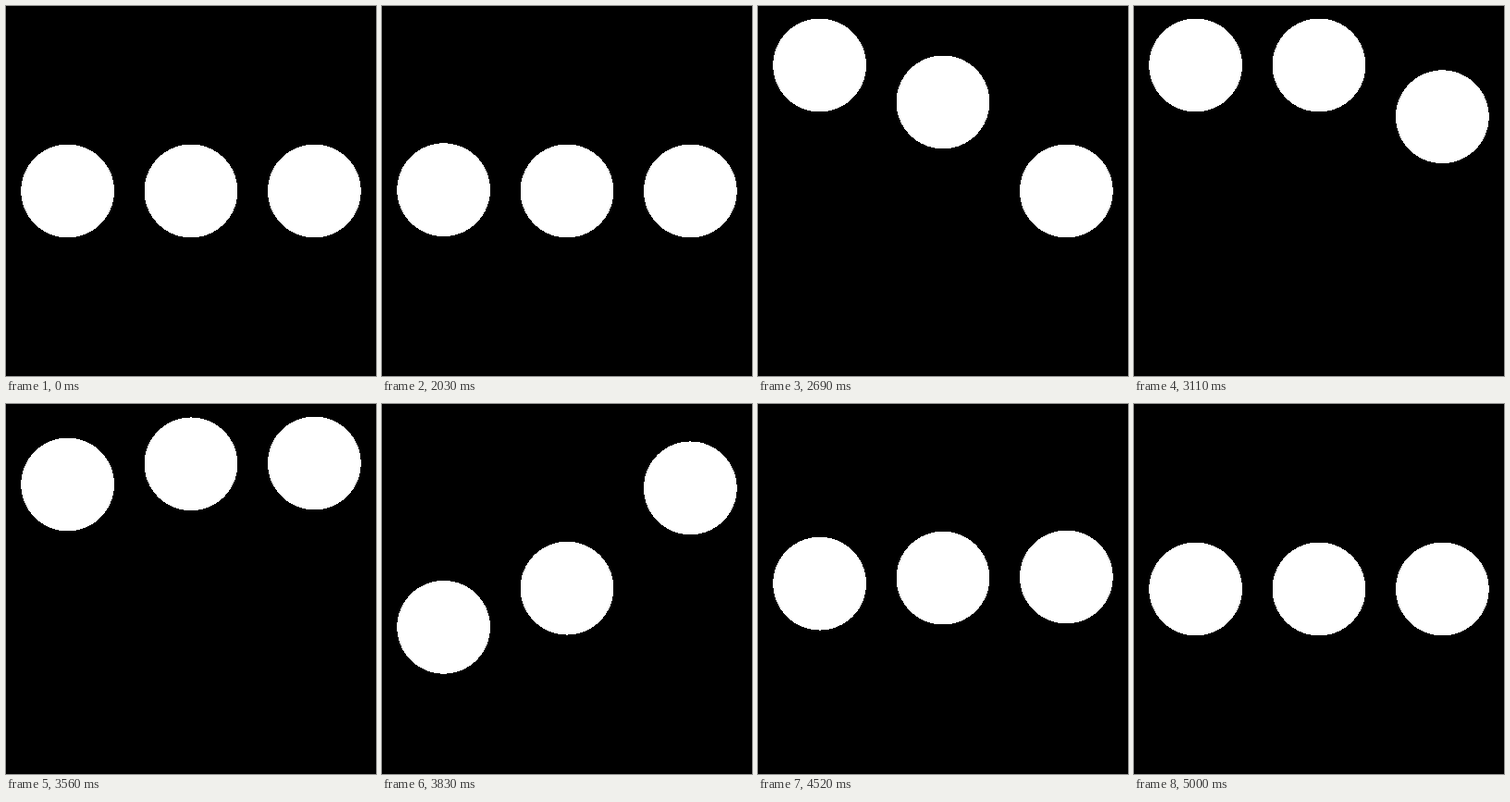
Write an HTML page that moves like this. It is 400 by 400 pixels and loops after 5.03 s.

```html
<!DOCTYPE html>
<html lang="en">
<head>
<meta charset="utf-8">
<title>Three dots</title>
<style>
  html, body { margin: 0; width: 100%; height: 100%; overflow: hidden; background: #000; }
  svg { display: block; width: 100vw; height: 100vh; }
</style>
</head>
<body>
<svg viewBox="0 0 400 400" fill="#fff" shape-rendering="crispEdges">
  <rect width="400" height="400" fill="#000"/>
  <circle cx="66.67" cy="200" r="50.4"/>
  <circle cx="200" cy="200" r="50.4"/>
  <circle cx="333.33" cy="200" r="50.4"/>
</svg>
<script>
const LOOP = 5030, HOLD = 2000, STEP = 30;
const SPAN = 15;                            // steps per move
const RISE_GAP = 15;                        // stagger between dots going up
const DROP_START = 46.33, DROP_GAP = 4.33;  // stagger going down
const REST = 200, TOP = 64, LOW = 241.4, REBOUND = 186.8;

// Cubic bezier easing (x1, 0, x2, 1), solved for x by bisection.
function ease(x1, x2) {
  return p => {
    if (p <= 0) return 0;
    if (p >= 1) return 1;
    let lo = 0, hi = 1, s;
    for (let i = 0; i < 24; i++) {
      s = (lo + hi) / 2;
      const x = 3 * (1 - s) * (1 - s) * s * x1 + 3 * (1 - s) * s * s * x2 + s * s * s;
      if (x < p) lo = s; else hi = s;
    }
    return s * s * (3 - 2 * s);
  };
}

const rise = ease(0.41, 0.38);
const drop = ease(0.763, 0.482);
const bounce = ease(0.32, 0.295);
const settle = ease(0.45, 0.5);

function dotY(index, step) {
  const up = (step - index * RISE_GAP) / SPAN;
  const down = (step - DROP_START - index * DROP_GAP) / SPAN;
  return REST
    + (TOP - REST) * rise(up)
    + (LOW - TOP) * drop(down)
    + (REBOUND - LOW) * bounce(down - 1)
    + (REST - REBOUND) * settle(down - 2);
}

const dots = document.querySelectorAll("circle");

function render(time) {
  const step = Math.max(0, Math.floor((time % LOOP - HOLD) / STEP));
  dots.forEach((dot, i) => dot.setAttribute("cy", dotY(i, step).toFixed(2)));
}

const start = performance.now();
function tick() {
  render(performance.now() - start);
  requestAnimationFrame(tick);
}
tick();
</script>
</body>
</html>
```
